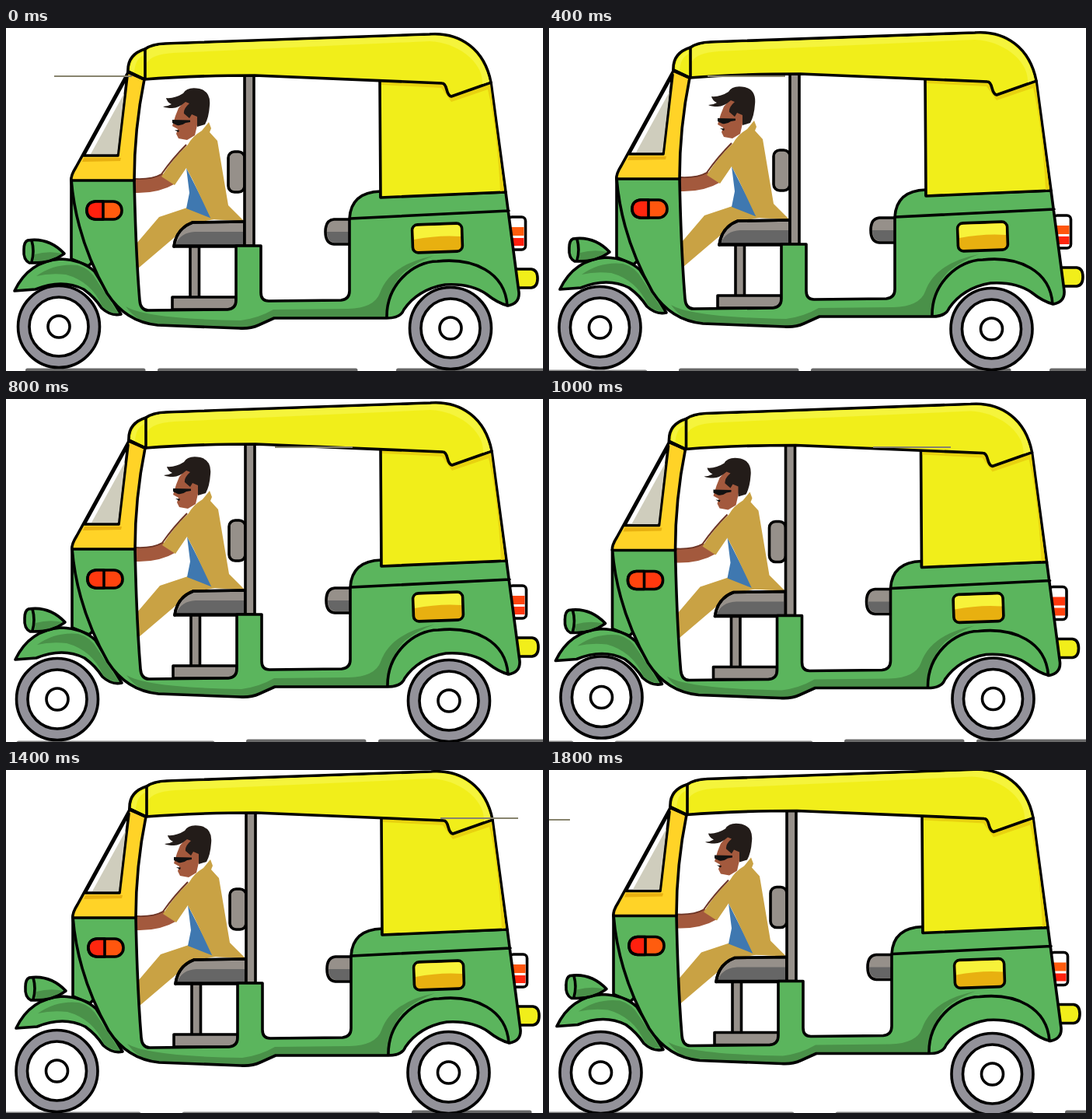
Write an HTML page that moves like this. It is 691 px wide and 441 px high and loops after 2000 ms.

```html
<!DOCTYPE html>
<html lang="en">
<head>
<meta charset="utf-8">
<title>Auto rickshaw</title>
<style>
html, body { margin: 0; width: 100%; height: 100%; overflow: hidden; background: #fff; }
svg { display: block; width: 100%; height: 100%; }
.ink { stroke: #000; stroke-width: 3.6; stroke-linejoin: round; stroke-linecap: round; }
.line { fill: none; }
.green { fill: #5bb55d; }
.moss { fill: #4a9149; }
.yellow { fill: #f1ee1a; }
.lemon { fill: #f5f43c; }
.mustard { fill: #e8d20f; }
.amber { fill: #ffd327; }
.ochre { fill: #e8b010; }
.steel { fill: #96908a; }
.dark { fill: #666; }
.tan { fill: #c9a244; }
.skin { fill: #a3593d; }
.hair { fill: #231c19; }
</style>
</head>
<body>
<svg viewBox="0 0 691 441">
  <defs>
    <g id="wheel" class="ink">
      <circle r="52.5" fill="#93929a"/>
      <circle r="38" fill="#fff"/>
      <circle r="14" fill="#fff"/>
    </g>
  </defs>

  <g id="road" stroke-width="5" stroke-linecap="round">
    <path d="M-700 442H-326M-268 442H-18" stroke="#808080"/>
    <path d="M27.500 440H177M197.500 440H450M504.500 440H760" stroke="#686868"/>
  </g>

  <g id="body">
    <!-- driver -->
    <path class="tan" d="M306 248L268 246 240 251 217 269 170 309 168 277 197 243 233 231Z"/>
    <path fill="#3f78b0" d="M232 180L265 245 232 232 236 212Z"/>
    <path class="skin" d="M166 194Q188 195 201 187L218 200Q196 213 166 212Z"/>
    <path class="tan" d="M200 191Q216 166 234 150 240 139 252 132L261 121 264 129 262 134 272 145 286 228 306 248 264 246 240 195 232 180 217 202Z"/>
    <path class="line" d="M166 194Q188 195 200 188 214 168 232 150" stroke="#6d3526" stroke-width="2"/>
    <path class="skin" d="M230 94L240 93 248 112 246 125 243 138 233 144 222 142 219 136 221 130 214 126 218 113 222 103Z"/>
    <path class="hair" d="M202 101Q206 103 214 103 222 103 231 95L236 97Q228 104 229 110L236 116 239 111 246 114V127L256 124Q261 115 262 100 264 82 249 78 233 75 228 84 217 91 206 90 207 95 213 98 208 101 202 101Z"/>
    <path fill="#111" d="M214 118L237 118.500V121L231 122Q226 126 220 125L214 122ZM217 131L223 131.500 222 134Z"/>

    <!-- seats and pole -->
    <g class="ink">
      <rect class="steel" x="237" y="278" width="11.500" height="70"/>
      <rect class="steel" x="214" y="346" width="82" height="16"/>
      <rect class="steel" x="286" y="159" width="21" height="52" rx="8"/>
      <path class="steel" d="M216 281Q219 258 240 250L307 249V281Z"/>
    </g>
    <path class="dark" d="M218 279Q224 263 243 262H305V279Z"/>
    <path class="line ink" d="M216 281Q219 258 240 250L307 249V280H216"/>
    <rect class="steel ink" x="307" y="60" width="12" height="220"/>
    <path class="steel ink" d="M443 246H422Q411 247 411 262T422 278H443Z"/>
    <path class="dark" d="M413 262H442V276H422Q413 274 413 262Z"/>

    <!-- rear lamp and bumper -->
    <rect class="ink" x="646" y="243" width="22.500" height="42" rx="5" fill="#fff"/>
    <rect id="tailTop" x="648" y="256" width="18.500" height="11"/>
    <rect id="tailLow" x="648" y="270" width="18.500" height="10"/>
    <path class="yellow ink" d="M654 310H676Q684 311 684 322T676 334H654Z"/>

    <!-- front mudguard and headlamp -->
    <path class="green ink" d="M84 195V297L106 306 112 300Z"/>
    <path class="green ink" d="M11 338Q29 300 70 297 98 298 114 313L148 368Q135 371 123 360 114 346 100 336 72 322 38 336Z"/>
    <path class="moss" d="M39 319Q63 302 92 305 108 309 117 325L144 366Q133 367 124 358 110 326 77 317 56 315 39 319Z"/>
    <path class="green ink" d="M28 273Q55 269 75 290 57 303 30 302 22 298 23 285 23 275 28 273Z"/>
    <path class="moss" d="M37 291Q55 286 72 290 58 300 36 300Z"/>
    <path class="line ink" d="M33 273Q37 287 33 301"/>

    <!-- lower body -->
    <path class="green" d="M84 195H165Q167 290 172 350 173 363 183 363L285 362Q296 361 296 350V280H328V340Q328 351 338 351L431 350Q442 349 442 338V245Q444 211 482 210V217L643 211 660 340Q661 354 646 357 633 354 618 342 598 328 565 330 530 336 512 362 508 373 490 373H345L325 382Q314 387 300 386L195 382Q154 378 130 341 90 270 84 195Z"/>
    <path class="moss" d="M154 358Q180 374 302 376 325 373 344 362L440 361Q474 360 481 341 494 304 550 293 530 300 512 314 490 336 490 373H345L325 382Q314 387 300 386L195 382Q170 380 154 358Z"/>
    <path class="line ink" d="M84 195H165Q167 290 172 350 173 363 183 363L285 362Q296 361 296 350V280H328V340Q328 351 338 351L431 350Q442 349 442 338V245Q444 211 482 210V217L643 211 660 340Q661 354 646 357 633 354 618 342 598 328 565 330 530 336 512 362 508 373 490 373H345L325 382Q314 387 300 386L195 382Q154 378 130 341 90 270 84 195ZM443 245L647 235M490 373C489 330 524 300 555 300C602 295 642 314 645 357"/>
    <g transform="rotate(-2 555 270)">
      <rect class="ochre ink" x="523" y="252" width="64" height="36" rx="7"/>
      <path fill="#f7f23a" d="M525 271V259Q525 254 530 254H580Q585 254 585 259V269Q556 266 525 271Z"/>
    </g>
    <rect id="lampRight" class="ink" x="104" y="223" width="45" height="23" rx="11"/>
    <path id="lampLeft" class="ink" d="M125 223H115Q104 224 104 234.500T115 246H125Z"/>

    <!-- windscreen -->
    <path class="amber ink" d="M157 57L178 66Q165 130 165 196H84Q83 190 90 179Z"/>
    <path class="ochre" d="M100 167H148L147 171 98 172Z"/>
    <path class="ink" fill="#fff" d="M156 62L144 164H100Z"/>
    <path fill="#cfcdbd" d="M152 84L143 162H109Z"/>

    <!-- rear canopy and roof -->
    <path class="yellow ink" d="M481 66L562 71 624 70 643 211 482 218Z"/>
    <path class="mustard" d="M483 69L562 72 573 89 623 72 641 209 636 210Q632 130 620 79L573 95 560 77 483 73Z"/>
    <path class="yellow ink" d="M157 56Q156 34 179 27 187 21 205 20L545 8C585 5 616 28 624 70L573 88Q569 87 567 79T561 71L320 61Q240 61 178 66Z"/>
    <path class="lemon" d="M160 55Q160 38 177 31V35Q166 40 165 57ZM181 29Q190 22 205 22L545 10C583 8 613 30 622 69L613 72C615 44 580 18 545 17L215 32Q187 34 181 45Z"/>
    <path class="line ink" d="M179 27V65M157 56L178 66"/>
  </g>

  <path id="wire" d="M62 62H162M-712 64H-612" stroke="#88846e" stroke-width="2"/>
  <use id="front" href="#wheel"/>
  <use id="back" href="#wheel"/>
</svg>
<script>
const STEP = 200, SPEED = 71;
// body dx, body dy, front wheel x, front wheel y
const poses = [
  [0, 0, 68, 384], [7, -3, 63, 386], [3, -2, 65.5, 385], [5, 0, 64.5, 384], [1, -3, 66, 386],
  [-2.5, -1.5, 67.5, 383.5], [-1, -8.5, 63, 387], [2, -6, 65.5, 387], [5, -1, 64, 384], [-1, -8.5, 66.5, 389]
];
const redness = [1, .9, .9, .9, .6, .4, 1, .9, .85, 1];
const el = id => document.getElementById(id);
const move = (id, x, y) => el(id).setAttribute("transform", `translate(${x} ${y})`);
const paint = (id, amount) => el(id).setAttribute("fill", `rgb(255 ${Math.round(92 - 60 * amount)} 14)`);

function draw(now) {
  const step = Math.floor(now / STEP) % poses.length;
  const [dx, dy, wheelX, wheelY] = poses[step];
  move("body", dx, dy);
  move("front", wheelX, wheelY);
  move("back", wheelX + 504, wheelY + 2);
  move("road", step * SPEED, 0);
  move("wire", step * SPEED, 0);
  const red = redness[step];
  paint("lampLeft", red);
  paint("lampRight", 1 - red);
  paint("tailTop", 1 - red);
  paint("tailLow", red);
  requestAnimationFrame(draw);
}
draw(performance.now());
</script>
</body>
</html>
```
